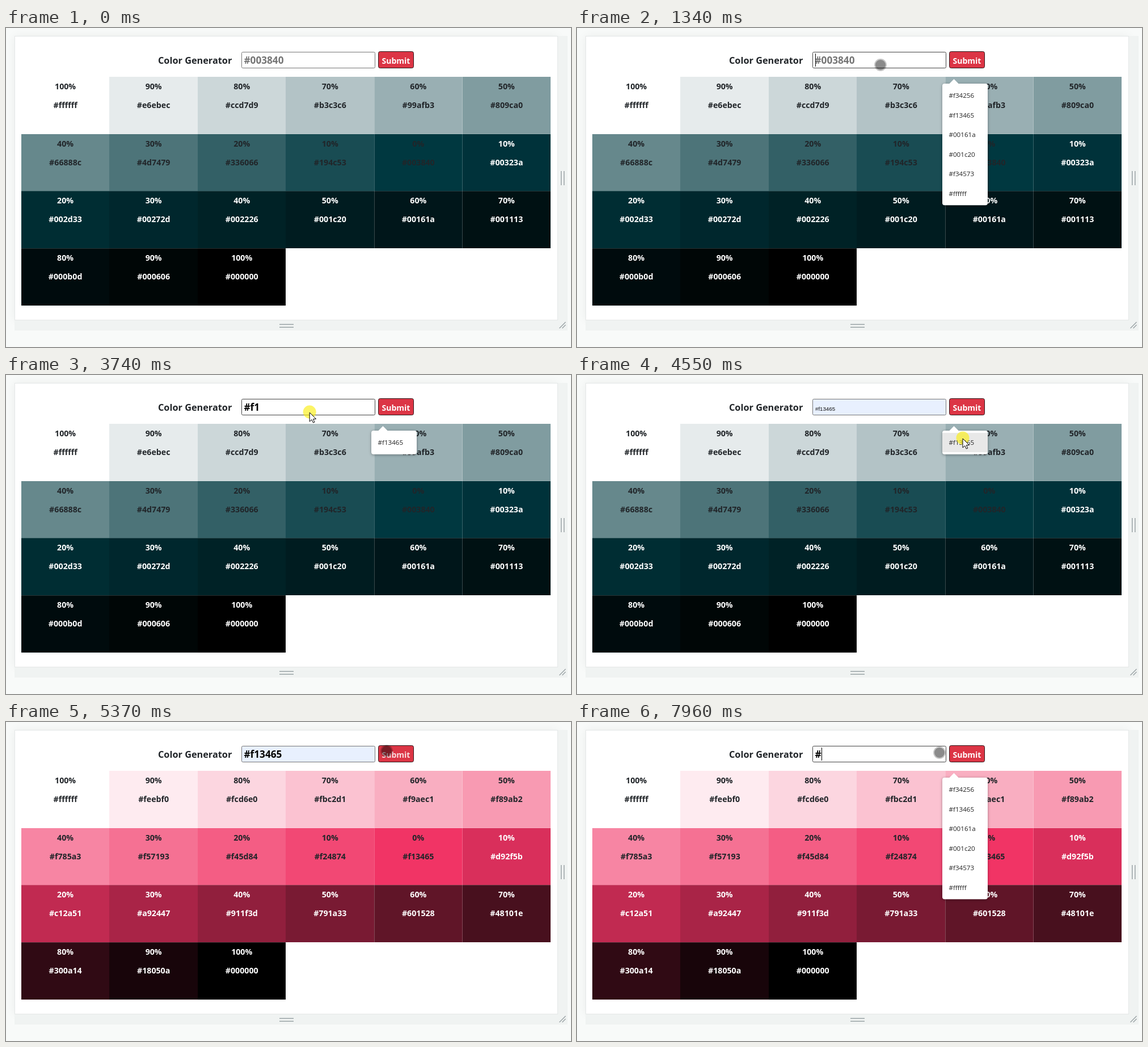
Write an HTML page with a canvas that moves like this. It is 996 px wide and 562 px high and loops after 8000 ms.

```html
<!DOCTYPE html>
<html lang="en">
<head>
<meta charset="utf-8">
<title>Color Generator</title>
<style>
html, body { margin: 0; width: 100%; height: 100%; overflow: hidden; background: #f8faf9; }
canvas { display: block; }
</style>
</head>
<body>
<canvas id="stage" width="996" height="562"></canvas>
<script>
const ctx = document.getElementById('stage').getContext('2d');
const LOOP = 8000;
const SANS = '"Open Sans", "Noto Sans", sans-serif';
const TEAL = [0, 56, 64], PINK = [241, 52, 101];
const HISTORY = ['#f34256', '#f13465', '#00161a', '#001c20', '#f34573', '#ffffff'];

// [start time, value typed in the field]
const TYPED = [[0, ''], [2330, '#'], [2750, '#f'], [3210, '#f1'], [4760, '#f13465'],
  [6760, '#f1346'], [7100, '#f134'], [7200, '#f13'], [7290, '#f1'], [7490, '#f'], [7900, '#']];
// [time, x, y] of the pointer
const PATH = [[120, 869, 511], [260, 715, 425], [400, 570, 300], [520, 508, 180], [620, 506, 105],
  [740, 533, 69], [800, 535, 67], [870, 535, 65], [3740, 535, 65], [4000, 580, 80], [4270, 648, 104],
  [4480, 680, 111], [4760, 680, 111], [5230, 671, 51], [5970, 671, 51], [6100, 639, 54], [8000, 639, 54]];
const PRESSED = [[770, 3740], [4620, 4760], [5370, 5510], [6300, 8000]];
const CARET = [[1140, 1670], [2200, 3740], [6760, 7760], [7900, 8000]];
const POPUP = [[1210, 4760], [6760, 8000]];
const PREVIEW = [[4270, 4760]];
const AUTOFILL = [[4270, 6760]];

const within = (spans, t) => spans.some(([a, b]) => t >= a && t < b);
const latest = (list, t) => list.filter(e => e[0] <= t).pop();
const hex = rgb => '#' + rgb.map(v => Math.round(v).toString(16).padStart(2, '0')).join('');

function palette(base) {
  const tiles = [];
  for (let n = 0; n <= 10; n++) {
    const white = 1 - n / 10;
    tiles.push({ pct: 100 - n * 10, color: hex(base.map(v => v * (1 - white) + 255 * white)), ink: '#212529' });
  }
  for (let n = 1; n <= 10; n++)
    tiles.push({ pct: n * 10, color: hex(base.map(v => v * (10 - n) / 10)), ink: '#fff' });
  return tiles;
}
const palettes = [palette(TEAL), palette(PINK)];

function rect(x, y, w, h, color) {
  ctx.fillStyle = color;
  ctx.fillRect(x, y, w, h);
}
function box(x, y, w, h, r, fill, border) {
  ctx.beginPath();
  ctx.roundRect(x, y, w, h, r);
  ctx.fillStyle = fill;
  ctx.fill();
  if (border) {
    ctx.strokeStyle = border;
    ctx.lineWidth = 1;
    ctx.stroke();
  }
}
function text(str, x, y, font, color, align = 'left') {
  ctx.font = font;
  ctx.fillStyle = color;
  ctx.textAlign = align;
  ctx.fillText(str, x, y);
}
function poly(points, color) {
  ctx.beginPath();
  points.forEach(([x, y]) => ctx.lineTo(x, y));
  ctx.closePath();
  ctx.fillStyle = color;
  ctx.fill();
}
function disc(x, y, r, color) {
  ctx.beginPath();
  ctx.arc(x, y, r, 0, 7);
  ctx.fillStyle = color;
  ctx.fill();
}

function drawFrame() {
  rect(0, 0, 996, 562, '#f8faf9');
  ctx.save();
  ctx.shadowColor = 'rgba(0,0,0,.06)';
  ctx.shadowBlur = 16;
  rect(15, 14, 958, 501, '#fff');
  ctx.restore();
  rect(15, 14, 975, 519, '#f0f3f2');
  rect(15, 14, 958, 501, '#e4e7e7');
  rect(16, 15, 956, 499, '#fff');
  const grip = '#9aa3a6';
  for (const d of [0, 5]) {
    rect(978 + d, 252, 1.5, 25, grip);
    rect(482, 521.5 + d, 25, 1.5, grip);
    ctx.beginPath();
    ctx.moveTo(975.5 + d, 529);
    ctx.lineTo(986.5, 518 + d);
    ctx.strokeStyle = grip;
    ctx.lineWidth = 1.5;
    ctx.stroke();
  }
}

function drawTiles(tiles) {
  const left = c => Math.round(26.8 + c * 155.55), top = r => Math.round(85.8 + r * 100.7);
  tiles.forEach(({ pct, color, ink }, i) => {
    const c = i % 6, r = Math.floor(i / 6), x = left(c), y = top(r);
    rect(x, y, left(c + 1) - x, top(r + 1) - y, color);
    const mid = 104.6 + c * 155.55, font = '700 14.2px ' + SANS;
    text(pct + '%', mid, y + 22, font, ink, 'center');
    text(color, mid, y + 55, font, ink, 'center');
  });
  // hairline seams between cells
  const seam = 'rgba(255,255,255,.22)';
  rect(649, 86, 1, 302, seam);
  rect(804, 86, 1, 302, seam);
  for (const r of [1, 2, 3]) rect(27, top(r) - (r > 1 ? 0 : 1), 933, 1, 'rgba(255,255,255,.16)');
}

function drawForm(t, value) {
  const big = '700 17.2px ' + SANS;
  text('Color Generator', 268, 63, '700 16.3px ' + SANS, '#212529');
  const focused = within(POPUP, t) && !within(PREVIEW, t);
  box(415.5, 42.5, 235, 28, 2, within(AUTOFILL, t) ? '#e8f0fe' : '#fff', focused ? '#444' : '#767676');
  if (within(PREVIEW, t)) text('#f13465', 420, 63, '9.7px "Liberation Sans", Arial, sans-serif', '#111');
  else text(value || '#003840', 419.5, 63, big, value ? '#000' : '#757575');
  if (within(CARET, t)) {
    ctx.font = big;
    rect(Math.round(419.5 + ctx.measureText(value).width), 45, 1, 23, '#000');
  }
  box(656.5, 41.5, 62, 29, 3, '#dc3545', '#2b1a1c');
  text('Submit', 687.5, 62.5, '700 14px ' + SANS, t >= 5370 && t < 5510 ? '#f9dfe1' : '#fff', 'center');
}

function drawPopup(t, value) {
  const items = HISTORY.filter(h => h.startsWith(value));
  ctx.save();
  ctx.shadowColor = 'rgba(0,0,0,.35)';
  ctx.shadowBlur = 5;
  ctx.shadowOffsetY = 1;
  box(644, 98, 80, 7.3 + items.length * 34.5, 4, '#fff');
  ctx.restore();
  poly([[656, 98.5], [664.5, 90], [673, 98.5]], '#fff');
  if (within(PREVIEW, t)) rect(644, 102, 80, 34, '#e8e8e8');
  items.forEach((h, i) => text(h, 655.5, 123.3 + i * 34.5, '11.6px ' + SANS, '#222'));
}

function drawPointer(t) {
  if (t < PATH[0][0]) return;
  const i = PATH.findIndex(p => p[0] > t);
  const [t0, x0, y0] = PATH[i - 1], [t1, x1, y1] = PATH[i];
  const k = (t - t0) / (t1 - t0), x = x0 + (x1 - x0) * k, y = y0 + (y1 - y0) * k;
  if (within(PRESSED, t)) {
    disc(x, y, 11, 'rgba(0,0,0,.22)');
    disc(x, y, 9, 'rgba(0,0,0,.3)');
    return;
  }
  disc(x, y, 11.5, 'rgba(250,238,20,.65)');
  const arrow = [[0, 0], [0, 16], [3.8, 12.6], [6.3, 18], [8.8, 17], [6.4, 11.6], [11.4, 11.4]];
  poly(arrow.map(([dx, dy]) => [x + dx, y + 1 + dy]), '#fff');
  ctx.strokeStyle = '#000';
  ctx.lineWidth = 1;
  ctx.stroke();
}

function draw(now) {
  const t = now % LOOP, value = latest(TYPED, t)[1];
  drawFrame();
  drawTiles(palettes[t >= 5370 ? 1 : 0]);
  drawForm(t, value);
  if (within(POPUP, t)) drawPopup(t, value);
  drawPointer(t);
}

const start = performance.now();
(function tick() {
  draw(performance.now() - start);
  requestAnimationFrame(tick);
})();
</script>
</body>
</html>
```
